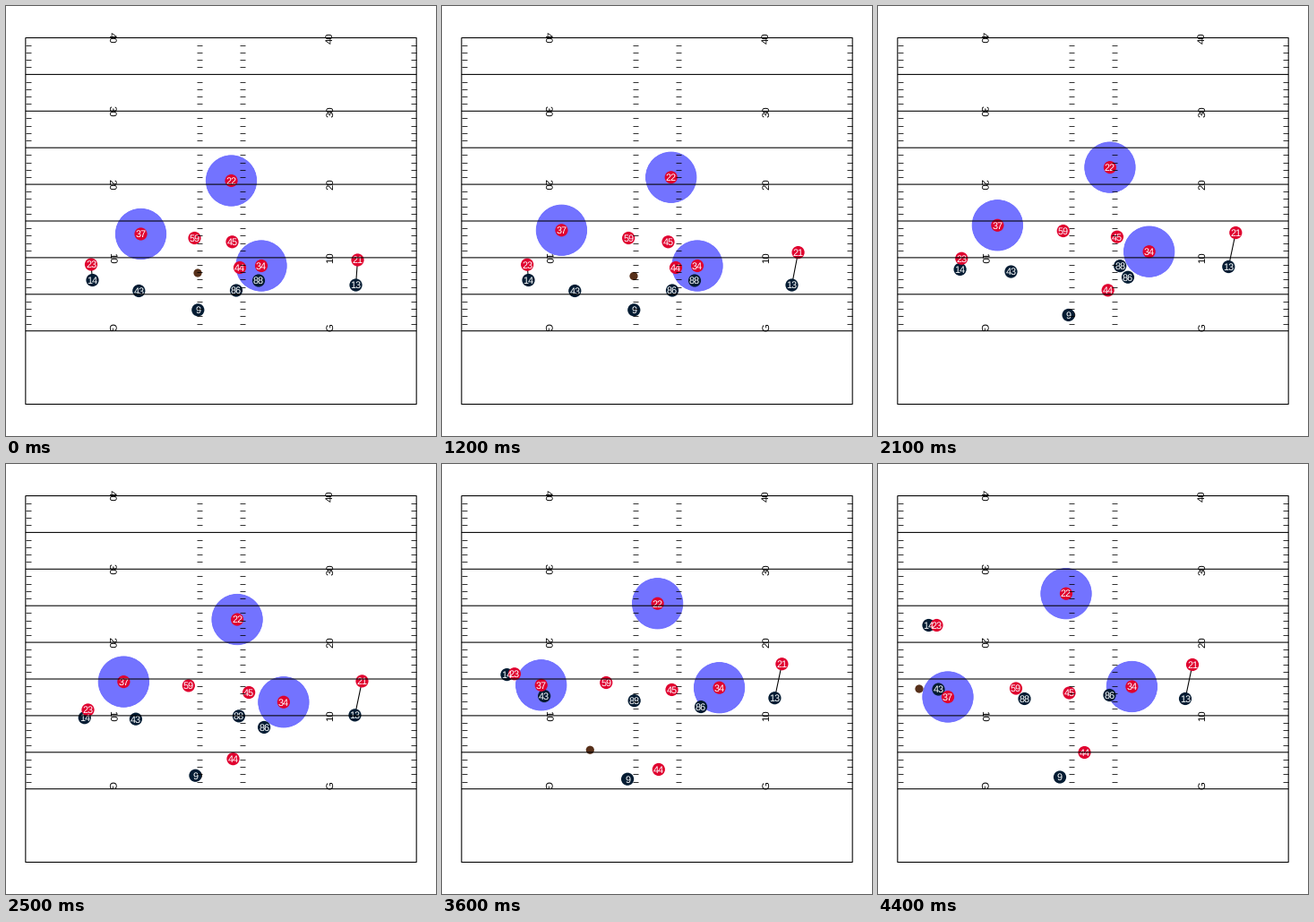
These frames come from a looping animation (480x480 px, 4500 ms). A matplotlib script:

```python
import numpy as np
import matplotlib.pyplot as plt
from matplotlib.animation import FuncAnimation
from matplotlib.patches import Circle

SIZE, FRAMES, STEP = 480, 45, 100
YARD = 8.18
LEFT, RIGHT = SIZE / 2 - 26.67 * YARD, SIZE / 2 + 26.67 * YARD
TOP, BOTTOM = SIZE / 2 - 25 * YARD, SIZE / 2 + 25 * YARD
GOAL = TOP + 40 * YARD
SNAP, CATCH, THROW, TIP = 12, 17, 33, 42
RED, NAVY, BROWN = "#e0022f", "#041c33", "#57301a"

plt.rcParams.update({"font.family": "Liberation Sans", "text.hinting": "none"})
t = np.arange(FRAMES)


def ramp(start, end):
    """Smooth 0 to 1 between two ticks, as a column."""
    u = np.clip((t - start) / (end - start), 0, 1)[:, None]
    return u * u * (3 - 2 * u)


def route(spot, bend, end, shift=(0, 0)):
    """Settle onto the spot, then run a curve that speeds up after the snap."""
    spot, bend, end, shift = map(np.array, (spot, bend, end, shift))
    settle = np.clip(1 - t / 16, 0, 1)[:, None] ** 2
    u = np.clip((t - SNAP - 1) / (FRAMES - SNAP - 2), 0, 1)[:, None] ** 1.25
    return (spot * (1 - u) ** 2 + 2 * bend * u * (1 - u) + end * u ** 2
            + shift * settle)


def cover(receiver, near, far, start, end):
    """Man coverage: shadow the receiver while the gap changes."""
    return receiver + np.array(near) + np.subtract(far, near) * ramp(start, end)


def pass_play(passer):
    """Snap to the passer, carry, throw, and a tip at the far end."""
    spot, tip, rest = (214, 301.5), (73, 255), (46, 251)
    held = passer + (3, 0)
    keys = [0, SNAP, CATCH, THROW, TIP, FRAMES - 1]
    stops = np.array([(214, 298), spot, held[CATCH], held[THROW], tip, rest])
    flight = np.column_stack([np.interp(t, keys, axis) for axis in stops.T])
    carried = (t >= CATCH) & (t <= THROW)
    return np.where(carried[:, None], held, flight)


offense = {
    14: route((96.5, 306), (84.6, 280), (56.5, 180)),
    43: route((148.3, 318), (158, 254), (67.5, 251.5)),
    9: route((214.3, 339.3), (210, 357), (203, 349.5)),
    86: route((257, 317.5), (330, 275), (258.5, 258)),
    88: route((282, 306.5), (256, 257), (163.5, 262)),
    13: route((390.5, 311.5), (398.5, 249), (343, 262)),
}
defense = {
    22: route((256, 191), (271, 160), (210, 144.7), shift=(-4.5, 4)),
    37: route((132.3, 250), (142, 231.5), (78, 260), shift=(18.2, 4.5)),
    59: route((208, 259), (210, 233.5), (154, 250.5), shift=(2.5, 0)),
    45: route((252.5, 263.3), (305, 245.5), (213.5, 255.5)),
    44: route((261, 292), (250, 373), (230.5, 322)),
    34: route((285, 290), (344, 242), (283.4, 248.5)),
    23: cover(offense[14], (-1.5, -17.5), (9, 0), 10, 40),
    21: cover(offense[13], (2, -28), (8, -38), 0, 16),
}
paths = offense | defense
ball_path = pass_play(offense[9])
ZONES = (22, 37, 34)
PAIRS = ((23, 14), (21, 13))

fig = plt.figure(figsize=(SIZE / 72, SIZE / 72), dpi=72, facecolor="white")
ax = fig.add_axes([0, 0, 1, 1])
ax.set(xlim=(0, SIZE), ylim=(SIZE, 0))
ax.axis("off")


def line(x, y, lw=1.07, z=8, snap=False):
    return ax.plot(x, y, color="black", lw=lw, zorder=z, snap=snap,
                   solid_capstyle="butt")[0]


def disc(radius, color, z, edge="none"):
    return ax.add_patch(Circle((0, 0), radius, fc=color, ec=edge, lw=0.8, zorder=z))


def draw_field():
    line([LEFT, RIGHT, RIGHT, LEFT, LEFT], [TOP, TOP, BOTTOM, BOTTOM, TOP])
    for yard in range(40):
        y = GOAL - yard * YARD
        if yard % 5 == 0:
            line([LEFT, RIGHT], [y, y])
            continue
        for x in (LEFT, 212.9, 260.8, RIGHT - 6.2):
            line([x, x + 6.2], [y, y], lw=0.8, snap=True)
    for yard in range(0, 41, 10):
        label = str(yard) if yard else "G"
        y = GOAL - yard * YARD - (0 if yard else 4.5)
        for x, angle in ((115, -90), (365, 90)):
            ax.text(x, y, label, size=11.4, rotation=angle, ha="center",
                    va="baseline", rotation_mode="anchor", zorder=7)


draw_field()
zones = {n: disc(28.2, "#7373ff", 1, "#6767ff") for n in ZONES}
links = [line([], [], z=2) for _ in PAIRS]
ball = disc(4.6, BROWN, 3)
dots = {n: disc(7.1, RED if n in defense else NAVY, 5 if n in defense else 4)
        for n in paths}
labels = {n: ax.text(0, 0, str(n), size=10.9, color="white", ha="center",
                     va="baseline", zorder=6) for n in paths}


def update(frame):
    for n, path in paths.items():
        x, y = path[frame]
        dots[n].center = x, y
        labels[n].set_position((x, y + 3.8))
        if n in zones:
            zones[n].center = x, y
    for link, (a, b) in zip(links, PAIRS):
        link.set_data(*zip(paths[a][frame], paths[b][frame]))
    ball.center = tuple(ball_path[frame])
    return []


anim = FuncAnimation(fig, update, frames=FRAMES, interval=STEP,
                     init_func=lambda: update(0), repeat=True, repeat_delay=0)
plt.show()
```
